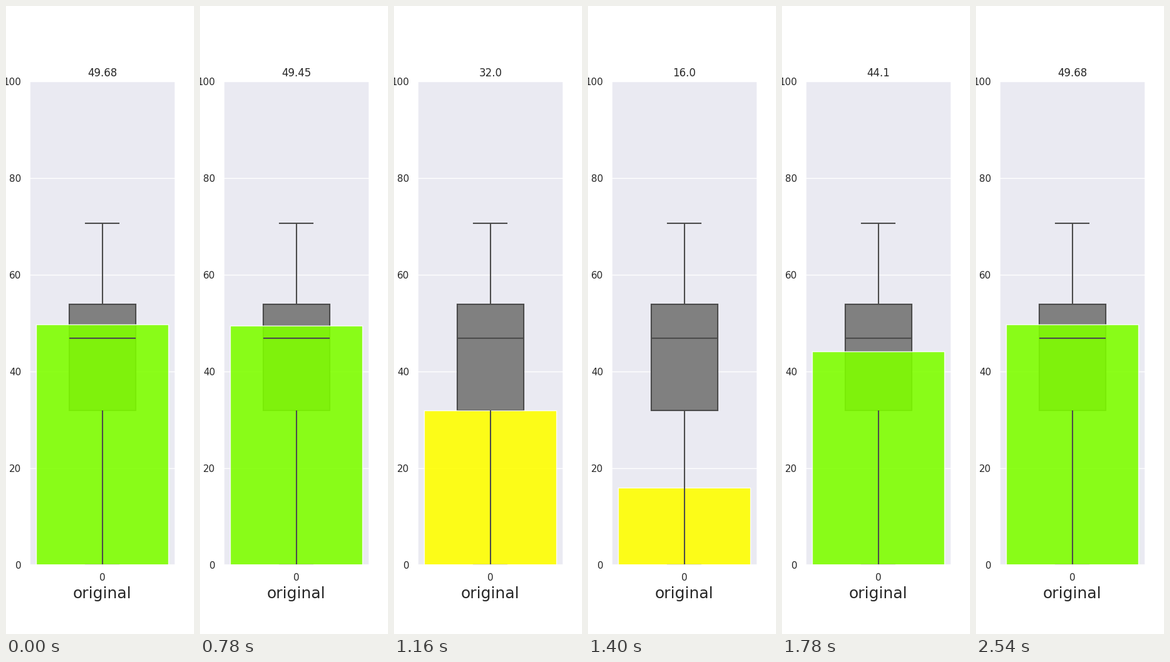
A matplotlib script that plays this animation: 300x1000 px, repeating every 2560 ms.

```python
import numpy as np
import matplotlib.pyplot as plt
from matplotlib.animation import FuncAnimation
from matplotlib.patches import Rectangle

TICK_MS = 20
TEXT, LINE, PANEL = "#262626", "#4c4c4c", "#eaeaf2"
LOW, Q1, MEDIAN, Q3, HIGH = 0, 32.0, 46.9, 53.95, 70.65
BAR_WIDTH, BOX_WIDTH, CAP_WIDTH = 0.8, 0.4, 0.2

plt.rcParams.update({"font.family": "DejaVu Sans", "text.color": TEXT})

# Readings at a few steps, joined by straight runs
steps = [0, 2, 4, 6, 8, 10, 12, 14, 17, 18, 19, 20, 22, 25, 28, 30, 31]
levels = [49.68, 56.4, 61.2, 58.3, 54.1, 48.52, 46.78, 47.31, 42.6,
          44.1, 49.45, 43.2, 31.4, 27.96, 0, 32.0, 34.7]
readings = np.interp(np.arange(32), steps, levels).round(2)

# Every fourth reading, from the third on, is held for five ticks; then all runs back
forward = np.repeat(readings, np.tile([1, 1, 5, 1], 8))
timeline = np.concatenate([forward, forward[::-1]])

fig, ax = plt.subplots(figsize=(3, 10), dpi=100, facecolor="white")
ax.set_facecolor(PANEL)
ax.set_axisbelow(True)
ax.set_xlim(-0.44, 0.44)
ax.set_ylim(0, 100)
ax.set_xticks([0])
ax.set_yticks(range(0, 101, 20))
ax.tick_params(length=0, pad=9.5, labelsize=11, labelcolor=TEXT)
ax.grid(axis="y", color="white", linewidth=1)
for spine in ax.spines.values():
    spine.set(color="white", linewidth=1.25)
ax.set_xlabel("original", fontsize=18, color=TEXT)
title = ax.set_title("", fontsize=12)


def stroke(xs, ys, cap="projecting"):
    ax.plot(xs, ys, color=LINE, linewidth=1.5, solid_capstyle=cap)


def level_line(y, width, cap="projecting"):
    stroke([-width / 2, width / 2], [y, y], cap)


ax.add_patch(Rectangle((-BOX_WIDTH / 2, Q1), BOX_WIDTH, Q3 - Q1,
                       facecolor="#808080", edgecolor=LINE, linewidth=1.5))
stroke([0, 0], [Q1, LOW], "butt")
stroke([0, 0], [Q3, HIGH], "butt")
level_line(LOW, CAP_WIDTH)
level_line(HIGH, CAP_WIDTH)
level_line(MEDIAN, BOX_WIDTH, "butt")

bar = ax.add_patch(Rectangle((-BAR_WIDTH / 2, 0), BAR_WIDTH, 0,
                             edgecolor="white", linewidth=1, alpha=0.9))


def update(frame):
    value = float(timeline[frame])
    bar.set_height(value)
    bar.set_facecolor("yellow" if value <= Q1 else "chartreuse")
    title.set_text(str(value))
    return bar, title


anim = FuncAnimation(fig, update, frames=len(timeline), interval=TICK_MS,
                     repeat=True, repeat_delay=0, blit=False)
plt.show()
```
